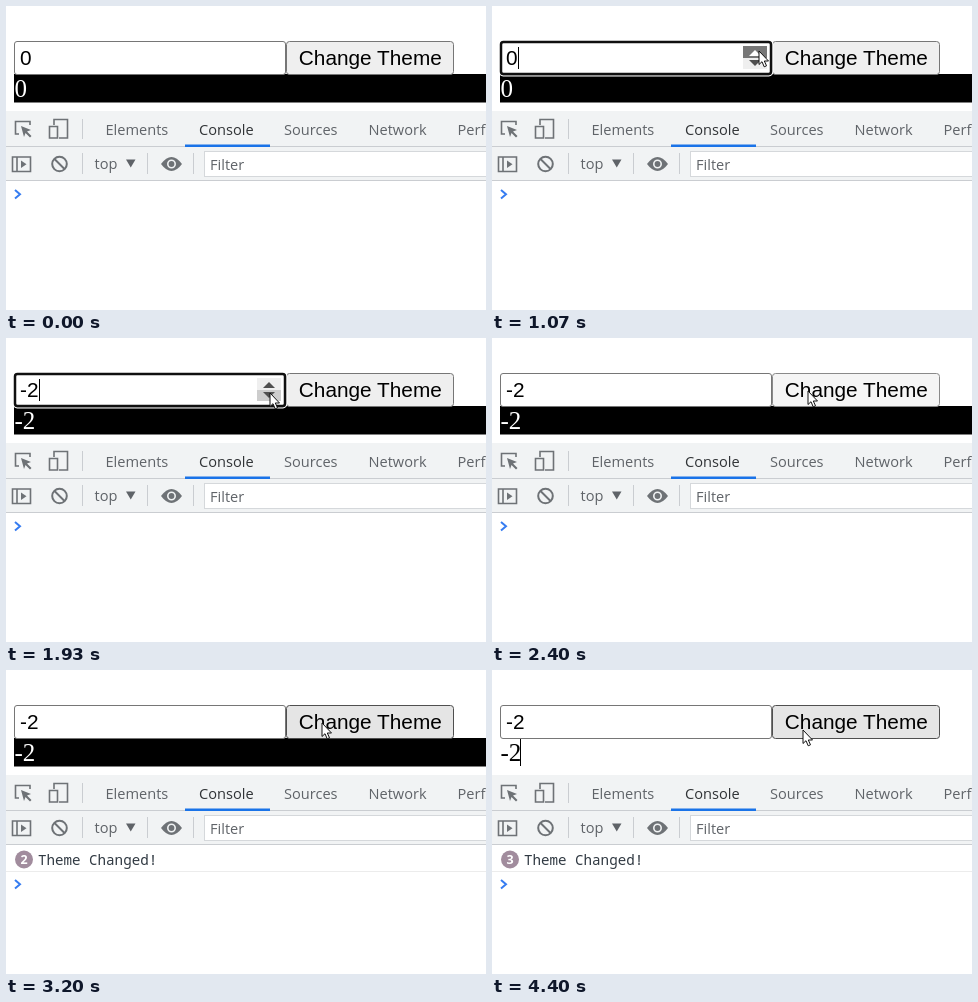
These frames come from a looping animation (480x304 px, 4.47 s). An HTML page:

```html
<!DOCTYPE html>
<html lang="en">
<head>
<meta charset="utf-8">
<title>Theme switch demo</title>
<style>
  html, body { margin: 0; width: 100%; height: 100%; overflow: hidden; background: #fff; }
  svg { display: block; width: 480px; height: 304px; }
  .ui { font: 14.6px "Open Sans", "Noto Sans", sans-serif; fill: #5f6368; }
  .form { font: 20.8px "Liberation Sans", Arial, sans-serif; }
  .serif { font: 25px "Liberation Serif", Times, serif; }
  .mono { font: 14.2px "Noto Sans Mono", "DejaVu Sans Mono", monospace; fill: #303942; }
  .icon { fill: none; stroke: #6e7276; stroke-width: 1.6; }
  .line { stroke: #cacdd1; }
</style>
</head>
<body>
<svg viewBox="0 0 480 304">
  <!-- page -->
  <rect id="panel" x="8" y="68" width="472" height="28.5"/>
  <text id="output" class="serif" x="8.5" y="91"/>
  <path id="panelCaret" stroke="#000" d="M28.5 68v28"/>
  <rect x="8.5" y="35.5" width="271" height="33" rx="2.5" fill="#fff" stroke="#767676"/>
  <rect id="button" x="280.5" y="35.5" width="167" height="33" rx="3"/>
  <text class="form" x="364.3" y="59" text-anchor="middle">Change Theme</text>
  <g id="ring" fill="none">
    <rect x="7.2" y="34.2" width="273.600" height="35.600" rx="4" stroke="#fff" stroke-width="1.300"/>
    <rect x="9" y="36" width="270" height="32" rx="2.500" stroke="#101010" stroke-width="2.500"/>
  </g>
  <text id="value" class="form" x="14" y="59"/>
  <path id="caret" stroke="#000" d="M.5 41v22"/>
  <g id="spinner">
    <rect id="up" x="251" y="40" width="24" height="12"/>
    <rect id="down" x="251" y="52" width="24" height="11"/>
    <path id="upArrow" d="M257 50l6-6 6 6z"/>
    <path id="downArrow" d="M257 54h12l-6 6z"/>
  </g>

  <!-- developer tools -->
  <rect y="105" width="480" height="70" fill="#f1f3f4"/>
  <path class="line" d="M0 140.5h480M0 174.5h480M76.5 113v20M76.5 147v21M141.5 147v21M187.5 147v21"/>
  <path stroke="#1a73e8" stroke-width="2.6" d="M179 139.7h85"/>
  <g class="ui">
    <text x="99.5" y="129">Elements</text>
    <text x="193" y="129" fill="#303336">Console</text>
    <text x="278" y="129">Sources</text>
    <text x="362.5" y="129">Network</text>
    <text x="451.5" y="129">Performance</text>
    <text x="88.5" y="163">top</text>
    <path d="M120 153.5h9.5l-4.75 8z"/>
  </g>
  <rect x="198.5" y="145.5" width="290" height="25" fill="#fff" stroke="#d5d8db"/>
  <text class="ui" x="204" y="164" fill="#757575">Filter</text>
  <g class="icon">
    <path d="M13 128H9.5V115.5H24V119"/>
    <path d="M15 120l10 4-4 1.5 4.5 4.5-1.5 1.5-4.5-4.5-1.5 4z" fill="#6e7276" stroke="none"/>
    <path d="M48 119v-5.5h13.5v18.5H53M43.5 120.5h8v11.5h-8z"/>
    <path d="M6.5 151h18v14.5h-18zM11 151v14.5"/>
    <path d="M15 154.5l5.5 3.7-5.5 3.7z" fill="#6e7276" stroke="none"/>
    <circle cx="53.5" cy="158" r="7.3" stroke-width="2"/>
    <path d="M48.5 153l10 10" stroke-width="2"/>
    <path d="M155 158q10.5-14 21 0q-10.5 14-21 0z" fill="#6e7276" stroke="none"/>
    <circle cx="165.5" cy="158" r="3.7" fill="#6e7276" stroke="#f1f3f4"/>
  </g>
  <g id="log">
    <path stroke="#ececec" d="M0 201.5h480"/>
    <text id="message" class="mono" y="195">Theme Changed!</text>
    <g id="badge">
      <circle cx="18" cy="189.5" r="9" fill="#a18c9d"/>
      <text id="count" x="18" y="194" text-anchor="middle" fill="#fff"
        style="font:bold 12.5px 'Open Sans',sans-serif"/>
    </g>
  </g>
  <path id="prompt" fill="none" stroke="#367cf1" stroke-width="2" d="M9 184l5 4.3-5 4.3"/>
  <path id="cursor" fill="#fff" stroke="#111" stroke-linejoin="round"
    d="M0 0V13.5l3-2.8 2.2 5.1 2.3-1-2.2-4.8h4.2z"/>
</svg>
<script>
const TICK = 1000 / 15, LOOP = 4470;
const $ = id => document.getElementById(id);
const set = (id, attrs) => {
  for (const k in attrs) $(id).setAttribute(k, attrs[k]);
};
const show = (id, on) => set(id, { visibility: on ? "visible" : "hidden" });

// Each track lists [tick, state]; a state holds until the next one.
const values = [[0, 0], [7, -1], [16, 0], [23, -1], [26, -2]];
const spins = [[0, ""], [6, "down"], [7, "down!"], [9, "down"], [13, "up"], [16, "up!"],
  [18, "up"], [22, "down"], [23, "down!"], [24, "down"], [26, "down!"], [28, "down"], [32, ""]];
const buttons = [[0, "idle"], [2, "hover"], [4, "idle"], [33, "hover"], [35, "active"],
  [37, "hover"], [43, "active"], [45, "hover"], [56, "active"], [58, "hover"]];
const clicks = [[0, 0], [37, 1], [45, 2], [58, 3]];
// Pointer stops: tick, x, y.
const path = [[1, 438, 109], [3, 340, 58], [5, 280, 30], [6, 264, 52], [12, 264, 52],
  [13, 267, 45], [21, 267, 45], [22, 264, 55], [31, 264, 55], [34, 316, 53],
  [58, 316, 53], [61, 311, 60], [67, 311, 60]];
const looks = { idle: ["#efefef", "#767676"], hover: ["#e5e5e5", "#4f4f4f"], active: ["#f5f5f5", "#8a8a8a"] };

const at = (track, n) => track.findLast(s => s[0] <= n)[1];

function position(n) {
  const i = Math.max(1, path.findIndex(p => p[0] >= n));
  const [a, ax, ay] = path[i - 1], [b, bx, by] = path[i];
  const k = Math.max(0, (n - a) / (b - a));
  return [ax + (bx - ax) * k, ay + (by - ay) * k];
}

function half(id, spin) {
  const hot = spin.startsWith(id), pressed = spin === id + "!";
  set(id, { fill: pressed ? "#777" : hot ? "#cdcdcd" : "#efefef" });
  set(id + "Arrow", { fill: pressed ? "#fff" : "#505050" });
}

function draw(time) {
  const n = Math.min(66, Math.floor((time % LOOP + 5) / TICK));
  const value = at(values, n), spin = at(spins, n), count = at(clicks, n);
  const focused = n >= 7 && n < 35, dark = count % 2 === 0;

  show("ring", focused);
  $("value").textContent = $("output").textContent = value;
  show("caret", focused);
  set("caret", { transform: `translate(${value < 0 ? 33 : 26} 0)` });

  show("spinner", spin);
  half("up", spin);
  half("down", spin);

  const [fill, stroke] = looks[at(buttons, n)];
  set("button", { fill, stroke });
  set("panel", { fill: dark ? "#000" : "#fff" });
  set("output", { fill: dark ? "#fff" : "#000" });
  show("panelCaret", n >= 66);

  show("log", count);
  // A nested visible item would ignore its hidden group, so both share the count.
  show("badge", count > 1);
  set("message", { x: count > 1 ? 32 : 27 });
  $("count").textContent = count;
  set("prompt", { transform: `translate(0 ${count ? 26 : 0})` });

  show("cursor", n > 0);
  set("cursor", { transform: `translate(${position(n)})` });
}

const start = performance.now();
function loop() {
  draw(performance.now() - start);
  requestAnimationFrame(loop);
}
loop();
</script>
</body>
</html>
```
